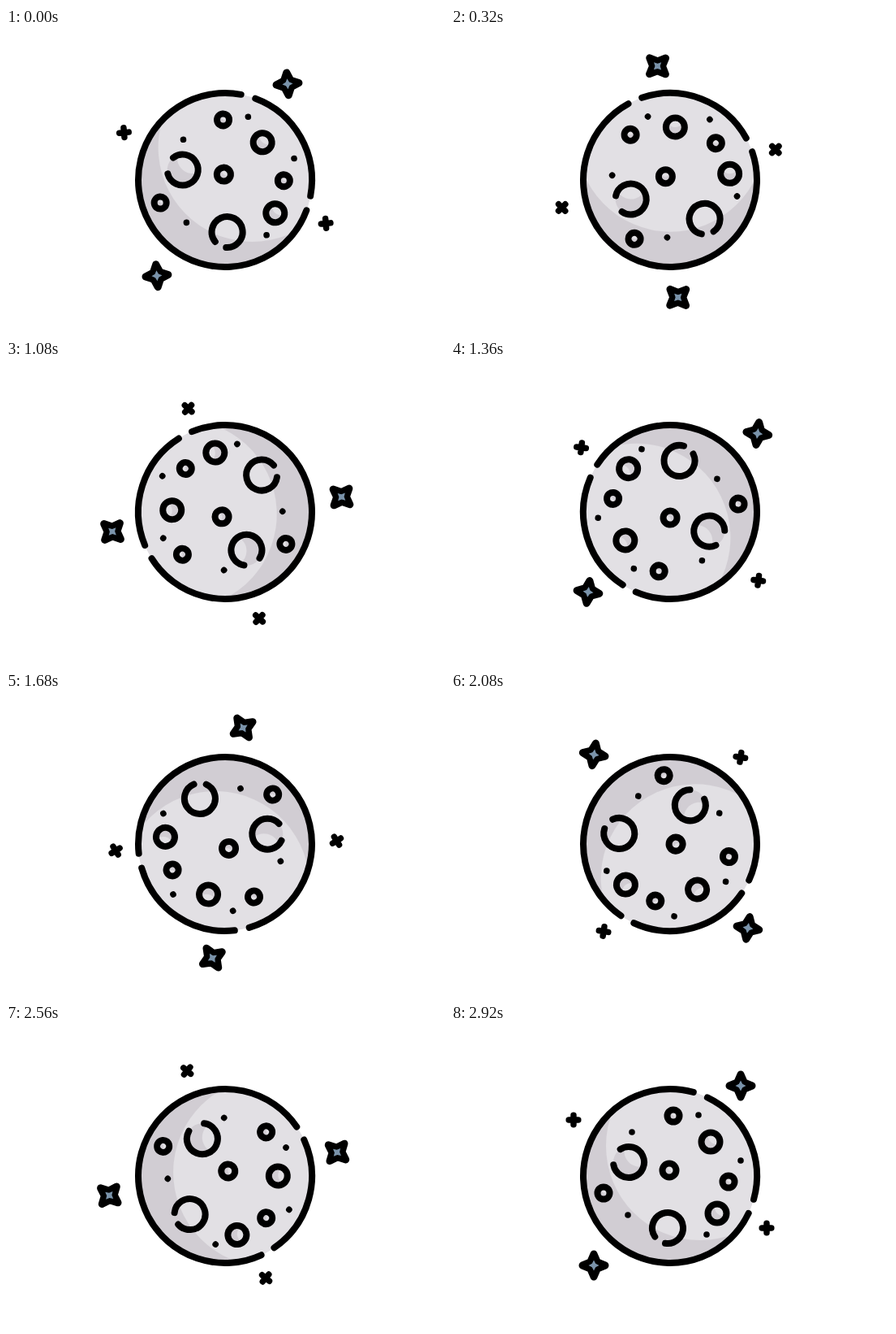
An HTML page that plays this animation: 541 px wide and 374 px high, repeating every 2960 ms.

```html
<!DOCTYPE html>
<html lang="en">
<head>
<meta charset="utf-8">
<title>Turning moon</title>
<style>
html, body { margin: 0; width: 100%; height: 100%; overflow: hidden; background: #fff; }
svg { display: block; }
</style>
</head>
<body>
<svg width="541" height="374" viewBox="-270 -187 541 374">
  <defs>
    <clipPath id="disc"><circle r="107"/></clipPath>
    <g id="star">
      <path d="M0-14L4.2-4.2L14 0L4.2 4.2L0 14L-4.2 4.2L-14 0L-4.2-4.2Z" stroke="#000" stroke-width="9" stroke-linejoin="round"/>
      <path d="M0-6.5L2.2-2.2L6.5 0L2.2 2.2L0 6.5L-2.2 2.2L-6.5 0L-2.2-2.2Z" fill="#7a93aa"/>
    </g>
    <path id="plus" d="M-5.8 0H5.8M0-5.8V5.8" stroke="#000" stroke-width="7.5" stroke-linecap="round"/>
  </defs>
  <g id="scene">
    <g clip-path="url(#disc)">
      <circle r="107" fill="#d1cdd3"/>
      <circle cx="37" cy="-37" r="116" fill="#e2e0e4"/>
    </g>
    <g id="moon" fill="none" stroke="#000" stroke-width="8" stroke-linecap="round"></g>
    <use href="#star" x="87" y="-111"/>
    <use href="#star" x="-94" y="110"/>
    <use href="#plus" x="-119" y="-69"/>
    <use href="#plus" x="119" y="64"/>
  </g>
</svg>
<script>
const scene = document.getElementById('scene');
const moon = document.getElementById('moon');
const FRAME = 40, FRAMES = 74, STEP = 4.922;

// Clockwise arc between two angles in degrees
function arc(x, y, r, from, to) {
  const at = a => `${x + r * Math.cos(a * Math.PI / 180)} ${y + r * Math.sin(a * Math.PI / 180)}`;
  return `<path d="M${at(from)}A${r} ${r} 0 ${to - from > 180 ? 1 : 0} 1 ${at(to)}"/>`;
}

// Crater floor: dark disc with a lit lens facing the upper right
function crater(x, y, r) {
  const h = r * 0.866;
  return `<g transform="translate(${x} ${y}) rotate(-45)" stroke="none">
    <circle r="${r}" fill="#d1cdd3"/>
    <path fill="#e2e0e4" d="M${r / 2} ${-h}A${r} ${r} 0 0 1 ${r / 2} ${h}A${r} ${r} 0 0 1 ${r / 2} ${-h}"/></g>`;
}

const rings = [
  [4, -74, 7.5], [72, 7, 7.5], [-82, 21, 7.5], [-1, -7, 8.5],
  [50, -42, 11.5], [58, 46, 11.5]
];
const dots = [[35, -75], [-47, -54], [87, -19], [-52, 48], [45, 72]];

moon.innerHTML =
  rings.map(([x, y, r]) => crater(x, y, r) + `<circle cx="${x}" cy="${y}" r="${r}"/>`).join('') +
  dots.map(([x, y]) => `<circle cx="${x}" cy="${y}" r="3.8" fill="#000" stroke="none"/>`).join('') +
  crater(-51, -17, 19) + arc(-51, -17, 19, 237, 530) +
  arc(-3, 64, 19, 146, 459) +
  arc(0, 0, 107, -64.6, 15.6) + arc(0, 0, 107, 25.4, 285.6);

function draw(now) {
  const n = Math.floor(now / FRAME) % FRAMES;
  scene.setAttribute('transform', `rotate(${-5 - Math.min(n * STEP, 355)})`);
  requestAnimationFrame(draw);
}
draw(performance.now());
</script>
</body>
</html>
```
